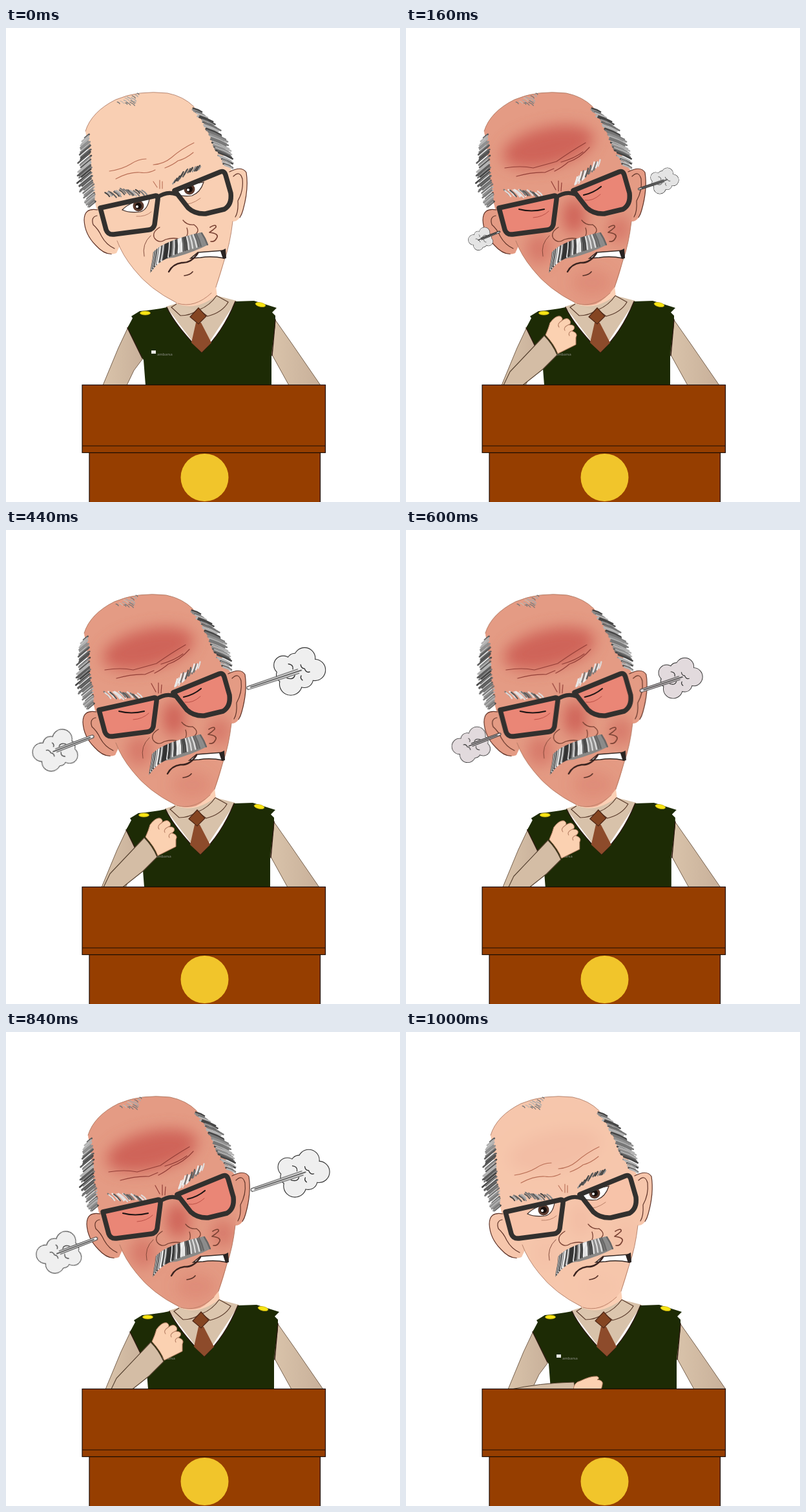
An HTML page for the animation above (1.04 s loop, 610 by 735 pixels).

```html
<!DOCTYPE html>
<html lang="en">
<head>
<meta charset="utf-8">
<title>Angry speaker</title>
<style>
html, body { margin: 0; width: 100%; height: 100%; overflow: hidden; background: #fff; }
svg { display: block; width: 100vw; height: 100vh; }
.ln { fill: none; stroke-linecap: round; stroke-linejoin: round; }
text { font: 6.5px Lato, sans-serif; }
</style>
</head>
<body>
<svg viewBox="0 0 610 735">
  <defs>
    <path id="head" d="M123 160Q132 130 170 111Q205 96 250 101Q275 106 291 122Q316 148 330 183L342 212L351 222Q357 262 351 300Q347 335 338 360Q332 385 325 402Q311 421 296 428Q280 433 264 426Q222 405 198 374Q180 352 172 330L140 280Q130 240 128 190Z"/>
    <path id="earL" d="M142 282Q121 278 121 298Q122 320 139 337Q155 355 171 349L178 334L150 284Z"/>
    <path id="earR" d="M346 223Q365 213 372 224Q376 250 367 282Q362 301 350 300Z"/>
    <path id="lensL" d="M146 279L232 260Q236 260 235 266L230 305Q228 312 221 313L167 320Q158 321 155 313Z"/>
    <path id="lensR" d="M261 252L332 223Q338 221 340 228L348 256Q350 274 338 281L309 288Q293 289 282 279Z"/>
    <clipPath id="inHead"><use href="#head"/></clipPath>
    <filter id="soft" x="-50%" y="-50%" width="200%" height="200%"><feGaussianBlur stdDeviation="11"/></filter>
    <linearGradient id="sleeve"><stop offset="0" stop-color="#d9c3aa"/><stop offset="1" stop-color="#c8b09a"/></linearGradient>
    <g id="cloud"></g>
  </defs>

  <g id="man">
    <!-- sleeves -->
    <g fill="url(#sleeve)" stroke="#77624f" stroke-width="1">
      <path d="M190 462L174 496L150 554H187L198 531L213 511L206 470Z"/>
      <path d="M415 450L443 490L487 554H438L411 505Z"/>
    </g>
    <path d="M325 400L327 417L290 438L263 432V415Z" fill="#fbd0b5"/>
    <!-- shirt, vest, tie -->
    <path d="M248 432L264 427Q292 440 326 415L357 423L303 505Z" fill="#d8c2aa"/>
    <path d="M188 465L196 450L194 447L207 439Q230 437 249 433Q262 461 303 503Q335 473 355 424L384 423L419 434L412 441L417 446V460L411 505V554H216L213 515Z" fill="#1d2b05"/>
    <path class="ln" d="M249 433Q262 461 303 503Q335 473 355 424M188 465L211 512M417 452L412 508" stroke="#2b180f" stroke-width="1.4"/>
    <path d="M264 428L256 433L270 446Q285 446 296 438M326 415L344 425Q335 441 312 447L299 437Q316 430 326 415" fill="#dcc6ae" stroke="#5a3b2b" stroke-width="1.2"/>
    <path d="M294 457H302L318 488L303 503L287 488Z" fill="#8d4b2b"/>
    <path d="M298 434L310 447L298 459L285 448Z" fill="#854522" stroke="#4f2818" stroke-width="1.2"/>
    <g fill="#f7e414" stroke="#c5ad12" stroke-width=".7">
      <ellipse cx="215.5" cy="442" rx="8" ry="3"/>
      <ellipse cx="394" cy="429" rx="8" ry="3.2" transform="rotate(12 394 429)"/>
    </g>
    <rect x="225" y="500" width="7" height="5" fill="#e8e8e4"/>
    <text x="234" y="508" fill="#8c8e86">ambarsa</text>

    <!-- head -->
    <g fill="#f9cfb3">
      <use href="#earL"/><use href="#earR"/><use href="#head"/>
    </g>
    <g id="flush">
      <g fill="#e49b84"><use href="#earL"/><use href="#earR"/><use href="#head"/></g>
      <g clip-path="url(#inHead)"><g filter="url(#soft)" fill="#cf6459">
        <ellipse cx="222" cy="184" rx="72" ry="30" transform="rotate(-13 222 184)"/>
        <ellipse cx="262" cy="292" rx="18" ry="28"/>
        <ellipse cx="208" cy="342" rx="20" ry="24" opacity=".6"/>
        <ellipse cx="332" cy="312" rx="18" ry="22" opacity=".6"/>
        <ellipse cx="290" cy="395" rx="32" ry="22" opacity=".25"/>
      </g></g>
      <g fill="#ec8173" opacity=".8"><use href="#lensL"/><use href="#lensR"/></g>
    </g>
    <g class="ln" stroke="#5f3328" stroke-width="1.2">
      <use href="#earL" fill="none" stroke-dasharray="104 200"/>
      <use href="#earR" fill="none" stroke-dasharray="100 200"/>
      <path d="M141 291Q131 293 135 305Q143 312 148 323Q155 336 168 342M352 230Q362 220 366 234Q368 252 359 268Q360 285 355 293"/>
    </g>
    <path class="ln" d="M123 160Q132 130 170 111Q205 96 250 101Q275 106 291 122M172 330Q180 352 198 374Q222 405 264 426M351 300Q347 335 338 360L325 402" stroke="#a7735d" stroke-width=".8"/>
    <path class="ln" d="M266 427Q292 435 318 411" stroke="#bd826b" stroke-width="1"/>
    <g id="hair" class="ln"></g>

    <g id="calm">
      <path class="ln" d="M160 222Q180 219 193 211Q205 203 217 203M170 234Q190 223 207 224Q220 226 231 220M228 212Q244 211 256 201Q272 187 291 178M246 217Q259 212 266 206Q278 203 290 193M228 238L234 247M238 249V236M242 249V238" stroke="#b96e55" stroke-width="1.1"/>
      <g class="ln" id="browsCalm"></g>
      <path class="ln" d="M202 292Q216 293 225 285M274 273Q286 275 301 264" stroke="#b98068" stroke-width="1"/>
      <g fill="#fff" stroke="#3c2a25" stroke-width="1.2">
        <path d="M180 282Q193 268 222 265Q219 282 208 285Q190 287 180 282Z"/>
        <path d="M262 257Q277 243 306 239Q301 255 288 260Q273 262 262 257Z"/>
      </g>
      <g id="irises"></g>
    </g>
    <g id="angry">
      <path class="ln" d="M155 217Q180 213 199 217Q221 211 235 207Q259 190 280 178M173 230Q198 223 217 224L231 218M232 222Q244 216 253 208Q271 202 286 185M242 208Q263 202 276 192M227 238L234 251M238 253L238 237M242 253L243 240" stroke="#923e37" stroke-width="1.2"/>
      <g class="ln" id="browsAngry"></g>
      <path class="ln" d="M199 294Q214 293 223 284M279 267Q291 269 303 258" stroke="#b94f46" stroke-width="1"/>
      <path class="ln" d="M177 281Q196 286 216 281M277 259Q292 256 304 246" stroke="#1f1514" stroke-width="2.2"/>
    </g>

    <g class="ln" stroke="#32302e" stroke-width="7.5">
      <use href="#lensL"/><use href="#lensR"/>
      <path d="M234 263Q249 252 264 258" stroke-width="6"/>
    </g>
    <!-- nose, cheeks, mouth -->
    <g class="ln" stroke="#7a4234" stroke-width="1.3">
      <path d="M238 309Q225 317 230 326Q237 335 247 328Q260 324 271 328Q285 324 280 310M274 298Q280 306 291 305Q302 313 293 320"/>
      <path d="M316 309Q326 303 325 309Q321 313 315 317Q331 319 326 326Q323 332 317 331" stroke-width="1.7"/>
      <path d="M224 322Q210 335 214 354" stroke-width=".9"/>
      <path d="M276 384Q285 383 289 378" stroke="#583229" stroke-width="1.7"/>
    </g>
    <path d="M223 380Q226 350 238 339Q264 325 302 317L313 336Q290 348 260 356Q237 357 228 374Z" fill="#898886"/>
    <g id="tache" class="ln"></g>
    <path d="M286 357L297 348L336 345L338 357Q318 353 301 356Z" fill="#fff" stroke="#322622" stroke-width="1.6"/>
    <path d="M332 346L340 342L341 357L336 358Z" fill="#2a2422"/>
    <path class="ln" d="M252 378Q258 366 272 364Q287 365 297 349" stroke="#3b2420" stroke-width="2.4"/>

    <g id="fist" stroke-linejoin="round">
      <path d="M152 556L163 533L216 477Q229 490 236 507L214 529L180 556Z" fill="#d4bda5" stroke="#54402f" stroke-width="1.1"/>
      <path d="M218 476Q223 465 225 457Q234 445 241 447Q246 450 243 454Q252 447 256 454Q258 459 254 460Q265 460 262 467L259 470Q269 473 265 480V491L237 505Q232 491 218 476Z" fill="#fbd1b1" stroke="#b67f64" stroke-width="1"/>
      <path class="ln" d="M243 454Q235 459 239 464M254 460Q245 464 248 469M260 469Q252 472 255 477" stroke="#b67f64" stroke-width="1.1"/>
    </g>
    <g id="rest">
      <path d="M150 555Q200 544 252 543L254 555Z" fill="#d4bda5" stroke="#54402f" stroke-width="1"/>
      <path d="M251 555Q252 543 262 541Q278 533 288 534Q293 537 288 539Q298 540 296 547L294 555Z" fill="#fbd1b1" stroke="#b67f64" stroke-width="1"/>
    </g>
    <g id="steam"></g>
  </g>

  <g fill="#963e00" stroke="#1c0d04" stroke-width="1.2">
    <rect x="129" y="658.5" width="357.5" height="80"/>
    <rect x="118" y="553.5" width="376.5" height="105"/>
    <path d="M118 648H494.5"/>
  </g>
  <circle cx="307.5" cy="697" r="37" fill="#f1c52b"/>
</svg>

<script>
const $ = id => document.getElementById(id);
const lerp = (a, b, u) => a + (b - a) * u;
let seed = 7;
const rnd = () => (seed = seed * 16807 % 2147483647) / 2147483647;
const pick = list => list[Math.floor(rnd() * list.length)];
const stroke = (a, b, color, w, bend = 0) =>
  `<path d="M${a}Q${(a[0] + b[0]) / 2 + bend} ${(a[1] + b[1]) / 2 - bend} ${b}" stroke="${color}" stroke-width="${w}"/>`;

// Point at u along a polyline
function along(points, u) {
  const s = u * (points.length - 1), i = Math.min(Math.floor(s), points.length - 2);
  return [0, 1].map(k => lerp(points[i][k], points[i + 1][k], s - i));
}

// Row of short strands growing from a line
function strands(points, n, [vx, vy], colors, w, taper = .5) {
  let out = '';
  for (let i = 0; i < n; i++) {
    const u = i / (n - 1), p = along(points, u);
    const k = (1 - taper + taper * Math.sin(Math.PI * u)) * (.75 + rnd() * .4);
    const a = [p[0] + rnd() * 3, p[1] + rnd() * 3];
    out += stroke(a, [a[0] + vx * k, a[1] + vy * k], pick(colors), w, 1);
  }
  return out;
}

const greys = ['#454545', '#5d5d5d', '#8f8f8f', '#b2b2b2', '#777'];
const pale = ['#eee', '#ddd', '#777', '#e4dedc', '#555'];
const left = [[126, 164], [129, 190], [130, 220], [134, 248], [136, 268]];
const right = [[287, 123], [302, 142], [314, 165], [323, 186], [337, 210]];
$('hair').innerHTML =
  strands(left, 44, [-18, 15], greys, 2.6) +
  strands(right, 46, [25, 11], greys, 2.6) +
  strands([[172, 112], [203, 101]], 9, [7, 5], ['#aaa', '#777', '#c4b9b0'], 1.4) +
  strands([[182, 114], [196, 112]], 5, [7, 5], ['#999', '#777'], 1.2);
$('browsCalm').innerHTML =
  strands([[153, 255], [176, 248], [208, 251]], 17, [9, 8], greys, 2.1, .2) +
  strands([[257, 240], [277, 224], [297, 217]], 17, [5, -8], greys.slice(0, 3), 2.1, .2);
$('browsAngry').innerHTML =
  strands([[152, 250], [174, 249], [204, 253]], 17, [10, 10], pale, 2.2, .2) +
  strands([[261, 243], [277, 230], [297, 213]], 17, [4, -13], pale, 2.2, .2);

const quad = (a, b, c, u) => [0, 1].map(k => (1 - u) ** 2 * a[k] + 2 * u * (1 - u) * b[k] + u * u * c[k]);
let tache = '';
for (let i = 0; i < 42; i++) {
  const u = i / 41;
  tache += stroke(quad([229, 348], [246, 330], [303, 318], u), quad([225, 376], [240, 351], [312, 336], u),
    pick(['#333', '#444', '#8d8d8d', '#ddd', '#f0f0f0', '#666']), 2.3, 1);
}
$('tache').innerHTML = tache;
$('irises').innerHTML = [[205, 276], [284, 250]].map(([x, y]) =>
  `<circle cx="${x}" cy="${y}" r="8.5" fill="#5a3a2e"/><circle cx="${x}" cy="${y}" r="5" fill="#160f0d"/>
   <circle cx="${x - 2}" cy="${y + 1}" r="2" fill="#fff"/>`).join('');

// Steam cloud: outlined lobes under plain ones
const lobes = [[-24, -9, 14], [-6, -15, 12], [9, -20, 16], [25, -2, 16], [9, 12, 13], [-12, 20, 17], [-22, 6, 12], [0, 0, 16]];
const ring = attrs => lobes.map(([x, y, r]) => `<circle cx="${x}" cy="${y}" r="${r}" ${attrs}/>`).join('');
$('cloud').innerHTML = ring('stroke="#333" stroke-width="2.2"') + ring('') +
  '<path class="ln" d="M-16 -11Q-8 -10 -9 -3M3 -10Q4 -4 9 -4Q12 3 17 1M-18 11Q-8 14 -6 7M6 14Q2 11 4 7" stroke="#333" stroke-width="1.4"/>';

// Value at t in a table of [time, value] pairs
function at(table, t) {
  const i = table.findIndex(k => k[0] >= t);
  if (i <= 0) return table[i ? table.length - 1 : 0][1];
  const [a, x] = table[i - 1], [b, y] = table[i];
  return lerp(x, y, (t - a) / (b - a));
}

const sway = [[0, 0], [160, -2], [300, -2.5], [440, -2], [600, -.2], [760, 1.5], [920, 6.5], [1000, 8]];
const redness = [[0, 0], [80, .35], [120, .7], [160, 1], [920, 1], [960, .65], [1000, .16]];
const lift = [[120, 20], [160, 0], [920, 0], [960, 20]];
const shake = [[160, 0], [300, 4], [440, 0], [600, 4], [760, 0], [840, 4], [920, 0]];
const reach = [[0, 26], [.16, 42], [.32, 66], [.74, 97], [1, 99]];
const size = [[0, .35], [.16, .55], [.32, .86], [.74, 1], [1, 1]];
const gap = [[0, 0], [.32, 2], [.74, 14], [1, 16]];

function puff(p, x, y, turn, far, big) {
  const d = at(reach, p) * far, g = at(gap, p) * far, s = at(size, p) * big;
  const w = 3.2 * s;
  const fill = p < .25 ? '#e4e4e4' : p < .5 ? '#e2dadd' : '#efefef';
  return `<g transform="translate(${x} ${y}) rotate(${turn})" fill="${fill}">
    <use href="#cloud" transform="translate(${d}) rotate(19) scale(${s})"/>
    <path d="M${d} ${-w}L${g} ${-w * .8}Q${g - 3} 0 ${g} ${w * .8}L${d} ${w}" stroke="#333" stroke-width="1.1"/>
    <path d="M${g + 4} 0H${d + 5}" stroke="#333" stroke-width="1.3"/></g>`;
}

const show = (id, on) => $(id).style.display = on ? '' : 'none';

function draw(t) {
  const mad = t >= 120 && t <= 960;
  $('man').setAttribute('transform', `translate(${at(sway, t)} 0)`);
  $('flush').setAttribute('opacity', at(redness, t));
  show('calm', !mad);
  show('angry', mad);
  show('fist', mad);
  show('rest', t === 80 || t === 1000);
  const s = at(shake, t);
  $('fist').setAttribute('transform', `translate(${s} ${s}) rotate(${at(lift, t)} 155 553)`);
  const p = (t - 100) % 380 / 380;
  $('steam').innerHTML = mad && t < 960
    ? puff(p, 362, 250, -18.5, 1, 1) + puff(p, 147, 316, 159, .74, .87) : '';
}

const start = performance.now();
let last = -1;
function tick() {
  const now = (performance.now() - start) % 1040;
  const t = now < 80 ? 0 : Math.floor(now / 40) * 40;
  if (t !== last) draw(last = t);
  requestAnimationFrame(tick);
}
tick();
</script>
</body>
</html>
```
